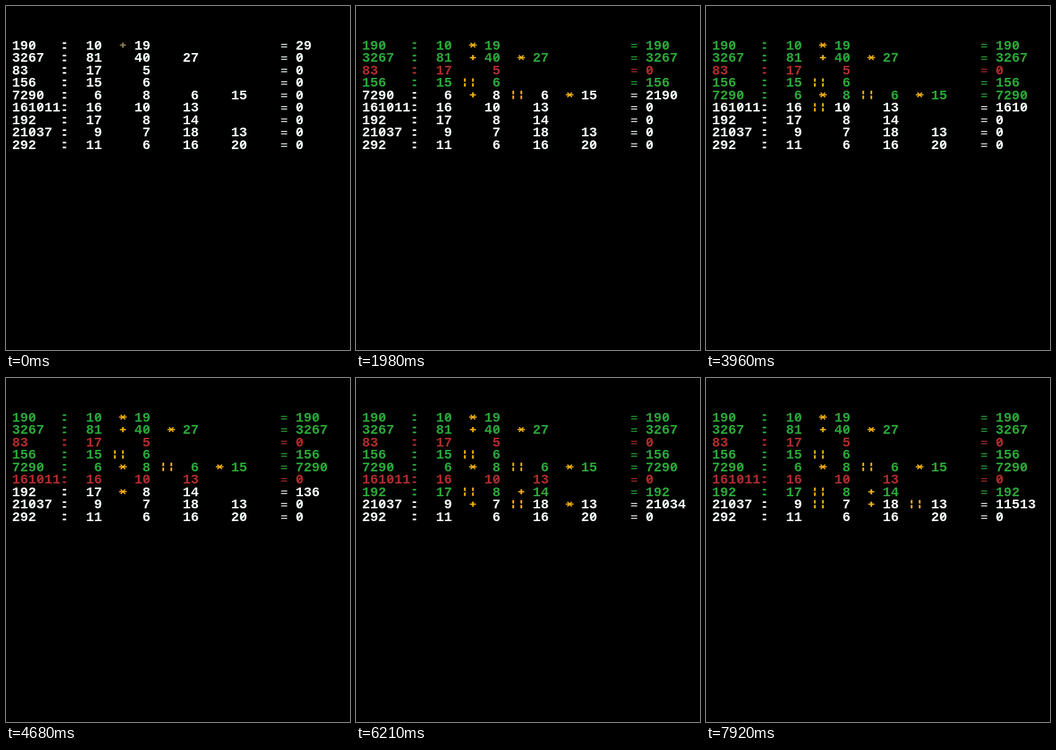
These frames come from a looping animation (512x512 px, 8 s). An HTML page with a canvas:

```html
<!DOCTYPE html>
<html lang="en">
<head>
<meta charset="utf-8">
<title>Operator search</title>
<style>
  html, body { margin: 0; width: 100%; height: 100%; overflow: hidden; background: #000; }
  canvas { display: block; width: 512px; height: 512px; }
</style>
</head>
<body>
<canvas id="stage" width="512" height="512"></canvas>
<script>
const LOOP = 8000, STEP = 90, PITCH = 12, LINE = 18.5;
const WHITE = '#f5fffa', GREEN = '#2aa838', RED = '#b02c2c', YELLOW = '#f2b211', DIM = '#8c7c4c';

const equations = [
  '190: 10 19', '3267: 81 40 27', '83: 17 5', '156: 15 6', '7290: 6 8 6 15',
  '161011: 16 10 13', '192: 17 8 14', '21037: 9 7 18 13', '292: 11 6 16 20'
].map(line => {
  const [target, terms] = line.split(': ');
  return { target: +target, terms: terms.split(' ').map(Number) };
});

const apply = {
  '+': (a, b) => a + b,
  '*': (a, b) => a * b,
  '||': (a, b) => Number(`${a}${b}`)
};

// Depth-first search; every partial result is one step. Returns true once solved.
function search({ target, terms }, steps, ops = [], value = terms[0]) {
  if (ops.length === terms.length - 1) return value === target;
  for (const op in apply) {
    const next = [...ops, op];
    const result = apply[op](value, terms[next.length]);
    steps.push({ ops: next, value: result });
    if (search({ target, terms }, steps, next, result)) return true;
  }
  return false;
}

let total = 0;
for (const eq of equations) {
  eq.start = total;
  eq.steps = [];
  eq.solved = search(eq, eq.steps);
  total += eq.steps.length;
}

const ctx = document.getElementById('stage').getContext('2d');
const idle = { ops: [], value: 0 };

function rowState(eq, tick) {
  const i = tick - eq.start;
  if (i < 0) return { ...idle, color: WHITE };
  if (i < eq.steps.length) return { ...eq.steps[i], color: WHITE };
  return eq.solved ? { ...eq.steps.at(-1), color: GREEN } : { ...idle, color: RED };
}

const bar = (cx, y, w, h) => ctx.fillRect(cx - w / 2, y, w, h);

function diagonal(cx, cy, dx, dy) {
  ctx.beginPath();
  ctx.moveTo(cx - dx, cy - dy);
  ctx.lineTo(cx + dx, cy + dy);
  ctx.stroke();
}

// Symbols are drawn around a cell centre, upwards from the baseline.
const symbols = {
  ':': (x, y) => { bar(x, y - 10.7, 5, 2.5); bar(x, y - 3.4, 5, 2.5); },
  '=': (x, y) => { bar(x, y - 8.2, 9, 1.4); bar(x, y - 4.5, 9, 1.4); },
  '+': (x, y) => { bar(x, y - 7.4, 9, 2); bar(x, y - 10.2, 2.6, 7.6); },
  '|': (x, y) => { bar(x, y - 12.6, 2.6, 5.2); bar(x, y - 5.4, 2.6, 5.2); },
  '*': (x, y) => {
    bar(x, y - 7.4, 11.4, 1.8);
    diagonal(x, y - 6.5, 3.4, 3.4);
    diagonal(x, y - 6.5, 3.4, -3.4);
  }
};

function write(text, left, y, color) {
  ctx.fillStyle = ctx.strokeStyle = color;
  [...String(text)].forEach((ch, i) => {
    const x = left + (i + 0.5) * PITCH;
    if (symbols[ch]) return symbols[ch](x, y);
    ctx.fillText(ch, x, y);
    if (ch === '0') diagonal(x, y - 6.5, 3.4, -4);
  });
}

const writeRight = (text, right, y, color) =>
  write(text, right - String(text).length * PITCH, y, color);

function draw(time) {
  const tick = Math.floor((time % LOOP) / STEP);
  ctx.fillStyle = '#000';
  ctx.fillRect(0, 0, 512, 512);
  ctx.font = 'bold 20px "Liberation Mono", monospace';
  ctx.textAlign = 'center';
  ctx.lineWidth = 1.8;
  equations.forEach((eq, row) => {
    const y = 64.7 + row * LINE;
    const { ops, value, color } = rowState(eq, tick);
    write(eq.target, 9, y, color);
    write(':', 81, y, color);
    eq.terms.forEach((term, i) => writeRight(term, 143 + 72 * i, y, color));
    ops.forEach((op, i) => writeRight(op, 180 + 72 * i, y, tick ? YELLOW : DIM));
    write('=', 408, y, color);
    write(value, 431, y, color);
  });
}

const began = performance.now();
function loop() {
  draw(performance.now() - began);
  requestAnimationFrame(loop);
}
loop();
</script>
</body>
</html>
```
